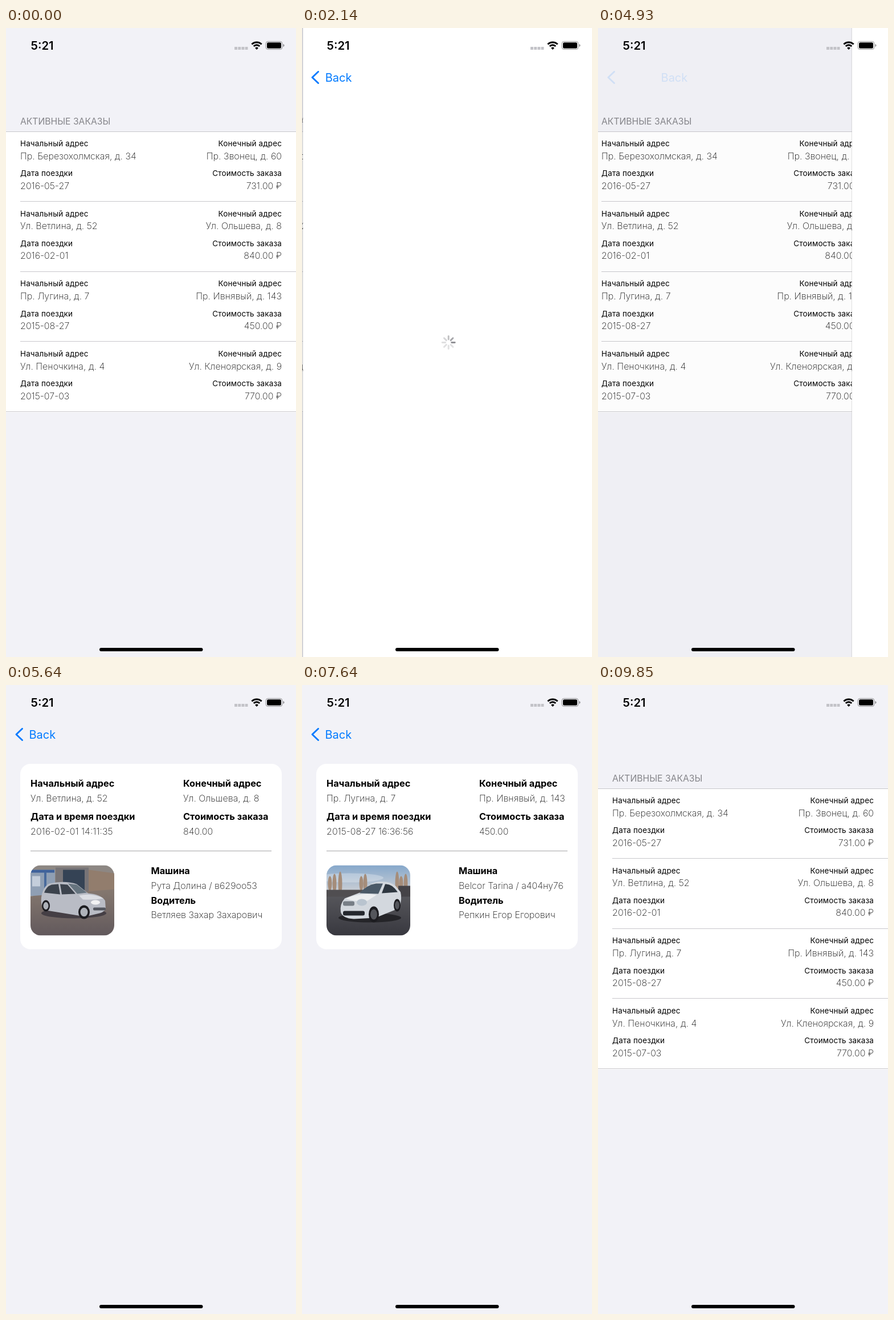
Recreate the animation shown at these times as an HTML page. Size 509 by 1101 pixels, loop 9980 ms.

```html
<!DOCTYPE html>
<html lang="ru">
<head>
<meta charset="utf-8">
<title>Заказы</title>
<style>
html, body { margin: 0; width: 100%; height: 100%; overflow: hidden; background: #f2f2f7; }
svg { display: block; width: 100vw; height: 100vh; font-family: Inter, Roboto, sans-serif; }
.label { font-size: 13.4px; font-weight: 400; letter-spacing: .2px; }
.value { font-size: 16px; font-weight: 200; fill: #111; }
.bold { font-size: 16.3px; font-weight: 700; }
.end { text-anchor: end; }
</style>
</head>
<body>
<svg viewBox="0 0 509 1101" preserveAspectRatio="none">
  <defs>
    <clipPath id="photo"><rect width="147" height="123" rx="18"/></clipPath>
    <linearGradient id="sky0" x2="0" y2="1"><stop stop-color="#6093d2"/><stop offset=".7" stop-color="#dfe5ee"/></linearGradient>
    <linearGradient id="sky2" x2="0" y2="1"><stop stop-color="#86a8cb"/><stop offset="1" stop-color="#e0dbd8"/></linearGradient>
    <linearGradient id="dirt" x2="0" y2="1"><stop stop-color="#85786f"/><stop offset="1" stop-color="#62595c"/></linearGradient>
    <linearGradient id="road" x2="0" y2="1"><stop stop-color="#55555a"/><stop offset="1" stop-color="#38383f"/></linearGradient>
    <linearGradient id="soil" x2="0" y2="1"><stop stop-color="#a59689"/><stop offset="1" stop-color="#7a6d69"/></linearGradient>
  </defs>
  <g id="list"></g>
  <rect id="dim" width="509" height="1101"/>
  <g id="page">
    <rect x="-1" width="1.5" height="1101" opacity=".12"/>
    <rect id="sheet" width="509" height="1101"/>
    <g id="spinner"></g>
    <g id="cards"></g>
  </g>
  <g id="nav">
    <path d="M28.5 76.5L18 86.5L28.5 96.5" fill="none" stroke="#007aff" stroke-width="2.9" stroke-linecap="round" stroke-linejoin="round"/>
    <text id="back" x="40.500" y="93.500" font-size="20" fill="#007aff">Back</text>
  </g>
  <g id="status">
    <text x="43.500" y="37.700" font-size="20.300" font-weight="600">5:21</text>
    <path d="M401 35.500h23.500" stroke="#c3c3c8" stroke-width="5" stroke-dasharray="5 1.200"/>
    <g fill="none" stroke="#000" stroke-width="3">
      <path d="M431.400 28.500a12.200 12.200 0 0 1 17.200 0"/>
      <path d="M434.800 32a7.300 7.300 0 0 1 10.400 0"/>
    </g>
    <path d="M440 38l-2.900-3a4.100 4.100 0 0 1 5.800 0z"/>
    <rect x="456" y="23.500" width="29" height="14" rx="4" fill="none" stroke="#000" stroke-opacity=".4"/>
    <rect x="458" y="25.300" width="25" height="10.400" rx="2.500"/>
    <path d="M486.500 28q2 .800 2 2.500t-2 2.500z" opacity=".45"/>
    <rect x="164" y="1085" width="181.500" height="6" rx="3"/>
  </g>
</svg>
<script>
const $ = id => document.getElementById(id);
const text = (x, y, s, cls) => `<text x="${x}" y="${y}" class="${cls}">${s}</text>`;
const rect = (x, y, w, h, fill, rx = 0) =>
  `<rect x="${x}" y="${y}" width="${w}" height="${h}" fill="${fill}" rx="${rx}"/>`;
const path = (d, fill) => `<path d="${d}" fill="${fill}"/>`;
const oval = (x, y, rx, ry, fill) => `<ellipse cx="${x}" cy="${y}" rx="${rx}" ry="${ry}" fill="${fill}"/>`;
const line = (x1, x2, y, color) => `<path d="M${x1} ${y}H${x2}" stroke="${color}"/>`;

const orders = [
  { from: 'Пр. Березохолмская, д. 34', to: 'Пр. Звонец, д. 60', date: '2016-05-27', clock: '19:50:00', cost: '731.00',
    x: 283, car: 'Mareto Dunvy / р207кк31', driver: 'Зорцов Олег Олегович' },
  { from: 'Ул. Ветлина, д. 52', to: 'Ул. Ольшева, д. 8', date: '2016-02-01', clock: '14:11:35', cost: '840.00',
    x: 254.5, car: 'Рута Долина / в629оо53', driver: 'Ветляев Захар Захарович' },
  { from: 'Пр. Лугина, д. 7', to: 'Пр. Ивнявый, д. 143', date: '2015-08-27', clock: '16:36:56', cost: '450.00',
    x: 275, car: 'Belcor Tarina / а404ну76', driver: 'Репкин Егор Егорович' },
  { from: 'Ул. Пеночкина, д. 4', to: 'Ул. Кленоярская, д. 9', date: '2015-07-03', cost: '770.00' }
];

const row = (o, i) => {
  const y = 181.5 + i * 122.8;
  return text(25, y + 25.3, 'Начальный адрес', 'label') + text(484, y + 25.3, 'Конечный адрес', 'label end') +
    text(25, y + 48, o.from, 'value') + text(484, y + 48, o.to, 'value end') +
    text(25, y + 77.5, 'Дата поездки', 'label') + text(484, y + 77.5, 'Стоимость заказа', 'label end') +
    text(25, y + 100, o.date, 'value') + text(484, y + 100, o.cost + ' ₽', 'value end') +
    line(i < 3 ? 25 : 0, 509, Math.round(y + 122.3) - 0.5, '#c8c7cc');
};

$('list').innerHTML = rect(0, 0, 509, 1101, '#f2f2f7') + rect(0, 181, 509, 492, '#fff') +
  '<text x="25" y="169" font-size="15.7" fill="#85858a">АКТИВНЫЕ ЗАКАЗЫ</text>' +
  line(0, 509, 181.5, '#c8c7cc') + orders.map(row).join('');

// Flat stand-ins for the three car pictures, each 147 x 123
const wheel = (x, y, rx, ry, rim) => oval(x, y, rx, ry, '#1c1c20') + oval(x, y, rx * .65, ry * .65, rim);
const photos = [
  rect(0, 0, 147, 60, 'url(#sky0)') + oval(70, 20, 60, 7, '#ffffff66') +
  rect(0, 32, 90, 20, '#b9a88f') + rect(50, 23, 40, 28, '#cdbb9d') + rect(98, 39, 49, 12, '#cfc4b2') +
  [35, 42].map(y => `<path d="M2 ${y}H90" stroke="#6d6458" stroke-width="4" stroke-dasharray="5 4"/>`).join('') +
  rect(0, 48, 147, 12, '#77714f') + rect(0, 59, 147, 64, 'url(#soil)') +
  oval(72, 106, 52, 6, '#38333a') +
  path('M36 64Q43 48 55 46H92Q104 47 112 63Q124 72 122 96Q121 109 112 110L30 108Q23 98 24 85Q25 71 36 64Z', '#141827') +
  path('M40 62Q47 50 56 49H91Q101 50 108 62Q74 56 40 62Z', '#2f3a50') +
  path('M33 74Q73 64 115 74Q74 69 33 74Z', '#3c4765') +
  oval(41, 79, 8, 4, '#d9cfc2') + oval(107, 79, 10, 4, '#d9cfc2') +
  rect(34, 88, 82, 8, '#070910', 4) + rect(61, 89, 28, 9, '#4a4b50'),

  rect(0, 0, 147, 50, '#8d8783') + rect(0, 8, 43, 46, '#8f9fb4') + rect(0, 8, 42, 5, '#3f629b') +
  rect(3, 19, 14, 18, '#c4cedb') + rect(24, 12, 4, 40, '#486a9c') +
  rect(44, 4, 58, 50, '#777477') + rect(57, 8, 38, 36, '#354355') +
  path('M102 8L147 14V50H102Z', '#927d6d') + path('M0 54L147 42V123H0Z', 'url(#dirt)') +
  oval(76, 84, 57, 9, '#453f45') +
  path('M19 56Q22 37 33 32Q60 26 81 33L101 49Q124 51 131 62L132 77Q128 83 117 85L96 90L28 79Q17 76 19 56Z', '#b9bcc5') +
  path('M24 48Q28 37 37 34L49 33L52 51Z', '#3c434d') + path('M52 33L65 34L79 50L55 51Z', '#3c434d') +
  path('M66 32L81 34L99 48L82 50Z', '#66747f') +
  path('M85 53Q108 48 128 58Q112 61 92 60Z', '#dcdee3') +
  oval(114, 65, 8, 4, '#f2f2f3') + rect(110, 74, 22, 5, '#53565e', 2) +
  wheel(27, 71, 7, 10, '#aeb2b9') + wheel(94, 82, 10, 12, '#aeb2b9'),

  rect(0, 0, 147, 60, 'url(#sky2)') + oval(40, 22, 60, 8, '#ffffff44') +
  [6, 14, 24, 61, 68, 124, 131, 139].map((x, i) => oval(x, 32, 3.5, 13 + i % 3 * 4, '#a58d7a')).join('') +
  rect(0, 43, 147, 14, '#504e51') + rect(126, 36, 21, 25, '#454347') + rect(0, 55, 147, 68, 'url(#road)') +
  oval(76, 92, 55, 8, '#242428') +
  path('M61 47Q74 31 91 29Q112 27 122 37L130 47Q133 58 128 75L86 92L48 94Q28 93 25 82Q23 68 32 58Z', '#d3d8de') +
  path('M58 49Q71 34 87 32L99 32L91 50Z', '#4a5967') + path('M97 49L103 33Q115 32 125 47Z', '#2e3740') +
  path('M34 58Q61 47 88 52L72 62Q51 65 34 58Z', '#eceef0') +
  oval(62, 65, 9, 6, '#b9c4cf') + rect(29, 63, 20, 8, '#777e86', 3) + rect(29, 80, 38, 8, '#24272d', 3) +
  wheel(83, 86, 9, 14, '#54565c') + wheel(124, 70, 6, 11, '#54565c')
];

const card = (o, i) => '<g>' + rect(25, 138, 459, 324.5, '#fff', 18) +
  text(43, 178, 'Начальный адрес', 'bold') + text(311, 178, 'Конечный адрес', 'bold') +
  text(43, 203.5, o.from, 'value') + text(311, 203.5, o.to, 'value') +
  text(43, 236, 'Дата и время поездки', 'bold') + text(311, 236, 'Стоимость заказа', 'bold') +
  text(43, 261.5, o.date + ' ' + o.clock, 'value') + text(311, 261.5, o.cost, 'value') +
  line(43, 466, 290.5, '#a6a6a8') +
  `<g transform="translate(43 315.5)" clip-path="url(#photo)">${photos[i]}</g>` +
  text(o.x, 331, 'Машина', 'bold') + text(o.x, 356.5, o.car, 'value') +
  text(o.x, 382.5, 'Водитель', 'bold') + text(o.x, 408, o.driver, 'value') + '</g>';
$('cards').innerHTML = orders.slice(0, 3).map(card).join('');

$('spinner').innerHTML = Array.from({ length: 8 }, (_, i) =>
  `<path d="M0 -5.5V-11" transform="translate(255.5 550.5) rotate(${i * 45})" stroke="#85858a" stroke-width="2.9" stroke-linecap="round"/>`).join('');
const spokes = [...$('spinner').children];
const cards = [...$('cards').children];

// Times below count ticks of 1/14 s
const LOOP = 9980, TICK = 1000 / 14;
const visits = [
  { push: 23.5, load: 37, press: 57, pop: 57.5, end: 65 },
  { push: 68.5, load: 77, press: 87, pop: 88.5, end: 96 },
  { push: 99.5, load: 107, press: 129, pop: 130.1, end: 136 }
];

// Critically damped spring from 0 to 1
const spring = ticks => {
  const a = ticks * TICK * 0.017;
  return 1 - (1 + a) * Math.exp(-a);
};
const show = (el, on) => el.setAttribute('display', on ? 'inline' : 'none');

function openness(k, v) {
  if (!v) return 0;
  if (k > v.pop) return 1 - spring(k - v.pop);
  return k >= v.load ? 1 : spring(k - v.push);
}

function draw(t) {
  const k = Math.floor((t + 8) / TICK);
  const n = visits.findIndex(v => k > v.push && k < v.end);
  const v = visits[n];
  const open = openness(k, v);

  $('list').setAttribute('transform', `translate(${-152.7 * open} 0)`);
  $('dim').setAttribute('opacity', 0.1 * open);
  show($('page'), v);
  show($('nav'), v);
  if (!v) return;

  const loaded = k >= v.load;
  $('page').setAttribute('transform', `translate(${509 * (1 - open)} 0)`);
  $('sheet').setAttribute('fill', loaded ? '#f2f2f7' : '#fff');
  show($('spinner'), !loaded);
  cards.forEach((c, i) => show(c, loaded && i === n));

  const lead = Math.floor((k - 30) * TICK / 100) + 2;
  spokes.forEach((s, i) => {
    const age = ((lead - i) % 8 + 8) % 8;
    s.setAttribute('opacity', Math.max(0.25, 0.9 - age * 0.19));
  });

  const fade = k > v.pop ? 0.4 * open : k >= v.press ? 0.2 : open;
  $('nav').setAttribute('opacity', fade);
  $('back').setAttribute('x', 40.5 + 80 * (1 - open));
}

function loop(now) {
  draw(now % LOOP);
  requestAnimationFrame(loop);
}
draw(0);
requestAnimationFrame(loop);
</script>
</body>
</html>
```
